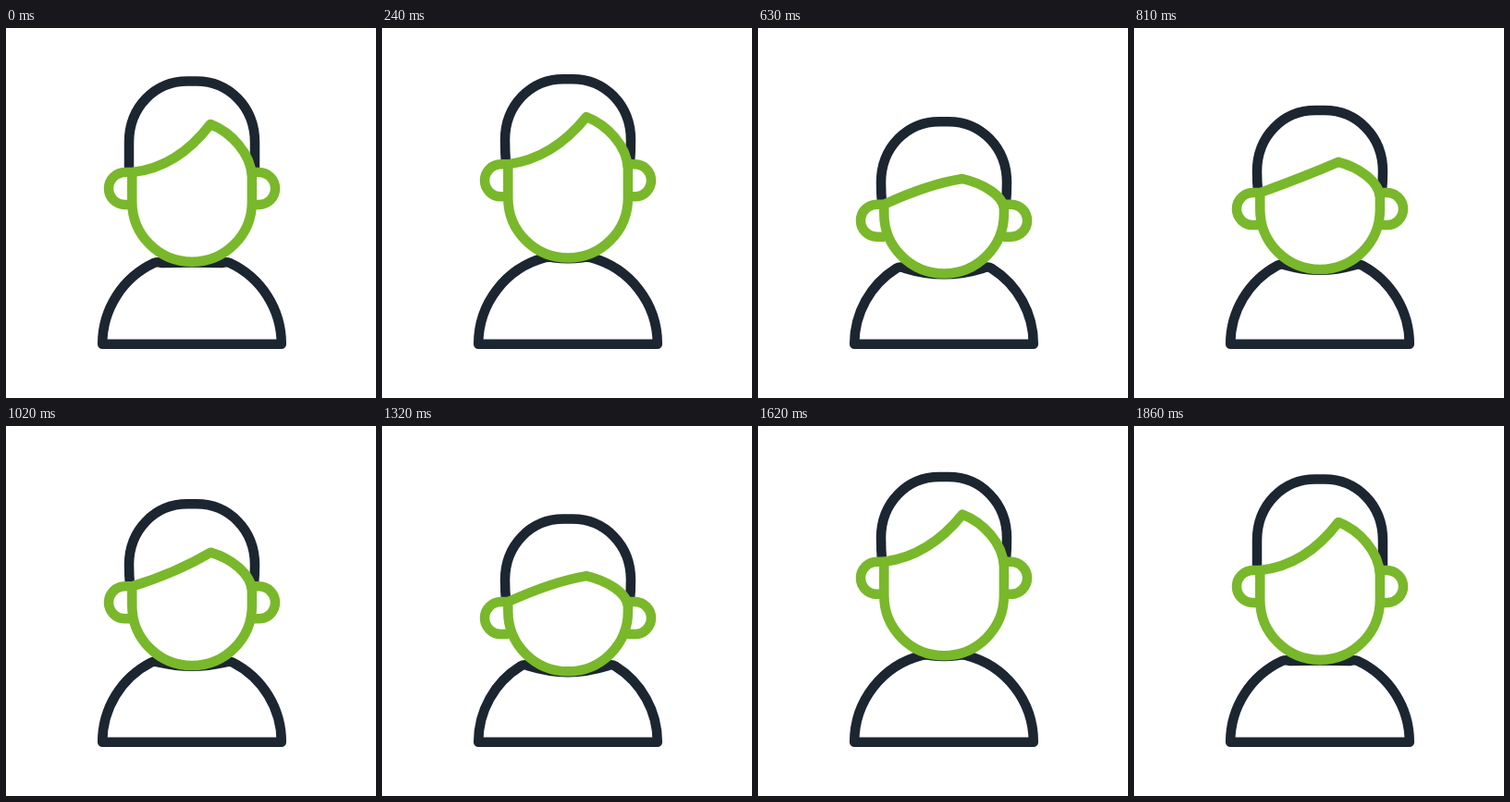
Write an HTML page with a canvas that moves like this. It is 400 px wide and 400 px high and loops after 4070 ms.

```html
<!DOCTYPE html>
<html lang="en">
<head>
<meta charset="utf-8">
<title>Nodding person</title>
<style>
  html, body { margin: 0; width: 100%; height: 100%; overflow: hidden; background: #fff; }
  canvas { display: block; width: 100vw; height: 100vh; }
</style>
</head>
<body>
<canvas id="stage"></canvas>
<script>
const SIZE = 400, LOOP = 4070, STEP = 30;
const DARK = '#1c2631', GREEN = '#79b82a';
const canvas = document.getElementById('stage');
const ctx = canvas.getContext('2d');

// Nod over time: 0 is rest, 1 is head down, negative is head up.
const NOD = [[0, 0], [170, -.35], [630, 1.02], [940, .44], [1290, 1.02], [1710, -.45], [1865, 0]];

// Heights of the parts at each amount of nod; tuck pulls the hair ends inwards.
const AMOUNT = [-.3, 0, .5, .64, 1];
const POSE = {
  crown: [55, 57.5, 84, 88.5, 100.5],
  tuck: [1.2, 0, 1.2, 1.2, 1.2],
  peak: [95.3, 104, 136, 144, 162],
  fringe: [140, 151, 158, 160, 168],
  ear: [164, 173.5, 190.5, 195, 207.5],
  chin: [248, 252.8, 258.8, 260.8, 265.3],
  neckX: [178, 160, 157, 155.5, 150]
};

function nodAt(t) {
  for (let i = 1; i < NOD.length; i++) {
    const [t0, a] = NOD[i - 1], [t1, b] = NOD[i];
    if (t < t1) return a + (b - a) * (1 - Math.cos(Math.PI * (t - t0) / (t1 - t0))) / 2;
  }
  return 0;
}

function poseAt(nod) {
  let i = 1;
  while (i < AMOUNT.length - 1 && nod > AMOUNT[i]) i++;
  const k = (nod - AMOUNT[i - 1]) / (AMOUNT[i] - AMOUNT[i - 1]);
  const pose = {};
  for (const key in POSE) pose[key] = POSE[key][i - 1] + k * (POSE[key][i] - POSE[key][i - 1]);
  return pose;
}

function line(color, trace) {
  ctx.strokeStyle = color;
  ctx.beginPath();
  trace();
  ctx.stroke();
}

function drawBody({ neckX, chin }) {
  const cx = 201, base = 341.8, r = 96.8;
  const angle = Math.acos((cx - neckX) / r);
  const neckY = base - r * Math.sin(angle);
  const bend = 4, bendY = neckY - bend / Math.tan(angle);
  const inner = cx - neckX - 2.2 * bend;
  line(DARK, () => {
    ctx.moveTo(cx - r, base);
    ctx.arc(cx, base, r, Math.PI, Math.PI + angle);
    ctx.quadraticCurveTo(neckX + bend, bendY, cx - inner, neckY);
    ctx.quadraticCurveTo(cx, 2 * (chin + .8) - neckY, cx + inner, neckY);
    ctx.quadraticCurveTo(2 * cx - neckX - bend, bendY, 2 * cx - neckX, neckY);
    ctx.arc(cx, base, r, -angle, 0);
    ctx.closePath();
  });
}

function drawHair({ crown, tuck, ear }) {
  const left = 133, right = 269, end = ear - 17, side = crown + 66;
  const mid = (end + side) / 2;
  line(DARK, () => {
    ctx.moveTo(left + tuck, end);
    ctx.quadraticCurveTo(left, mid, left, side);
    ctx.bezierCurveTo(left, crown + 28, 161, crown, 196, crown);
    ctx.lineTo(206, crown);
    ctx.bezierCurveTo(241, crown, right, crown + 28, right, side);
    ctx.quadraticCurveTo(right, mid, right - tuck, end);
  });
}

function drawEar(x, dir, y) {
  const r = 17.5;
  line(GREEN, () => {
    ctx.moveTo(x - dir * 7.5, y - r);
    ctx.lineTo(x, y - r);
    ctx.arc(x, y, r, -Math.PI / 2, Math.PI / 2, dir < 0);
    ctx.lineTo(x - dir * 8.5, y + r);
  });
}

function drawFace({ peak, fringe, ear, chin }) {
  const left = 136.3, right = 265.9, start = ear - 17.5, end = start + 5;
  const h = end - peak, r = (right - left) / 2;
  line(GREEN, () => {
    ctx.moveTo(left, start);
    ctx.quadraticCurveTo(185, fringe, 221, peak);
    ctx.bezierCurveTo(243, peak + .15 * h, 265, peak + .55 * h, right, end);
    ctx.arc(left + r, chin - r, r, 0, Math.PI);
    ctx.closePath();
  });
}

function draw(time) {
  const t = Math.floor((time % LOOP) / STEP) * STEP;
  const pose = poseAt(nodAt(t));
  const ratio = window.devicePixelRatio || 1;
  const w = Math.round(innerWidth * ratio), h = Math.round(innerHeight * ratio);
  if (canvas.width !== w || canvas.height !== h) {
    canvas.width = w;
    canvas.height = h;
  }
  ctx.setTransform(w / SIZE, 0, 0, h / SIZE, 0, 0);
  ctx.fillStyle = '#fff';
  ctx.fillRect(0, 0, SIZE, SIZE);
  ctx.lineWidth = 10.5;
  ctx.lineJoin = 'round';
  drawBody(pose);
  drawHair(pose);
  drawEar(128.5, -1, pose.ear);
  drawEar(273.5, 1, pose.ear);
  drawFace(pose);
}

const began = performance.now();
function tick() {
  draw(performance.now() - began);
  requestAnimationFrame(tick);
}
tick();
</script>
</body>
</html>
```
